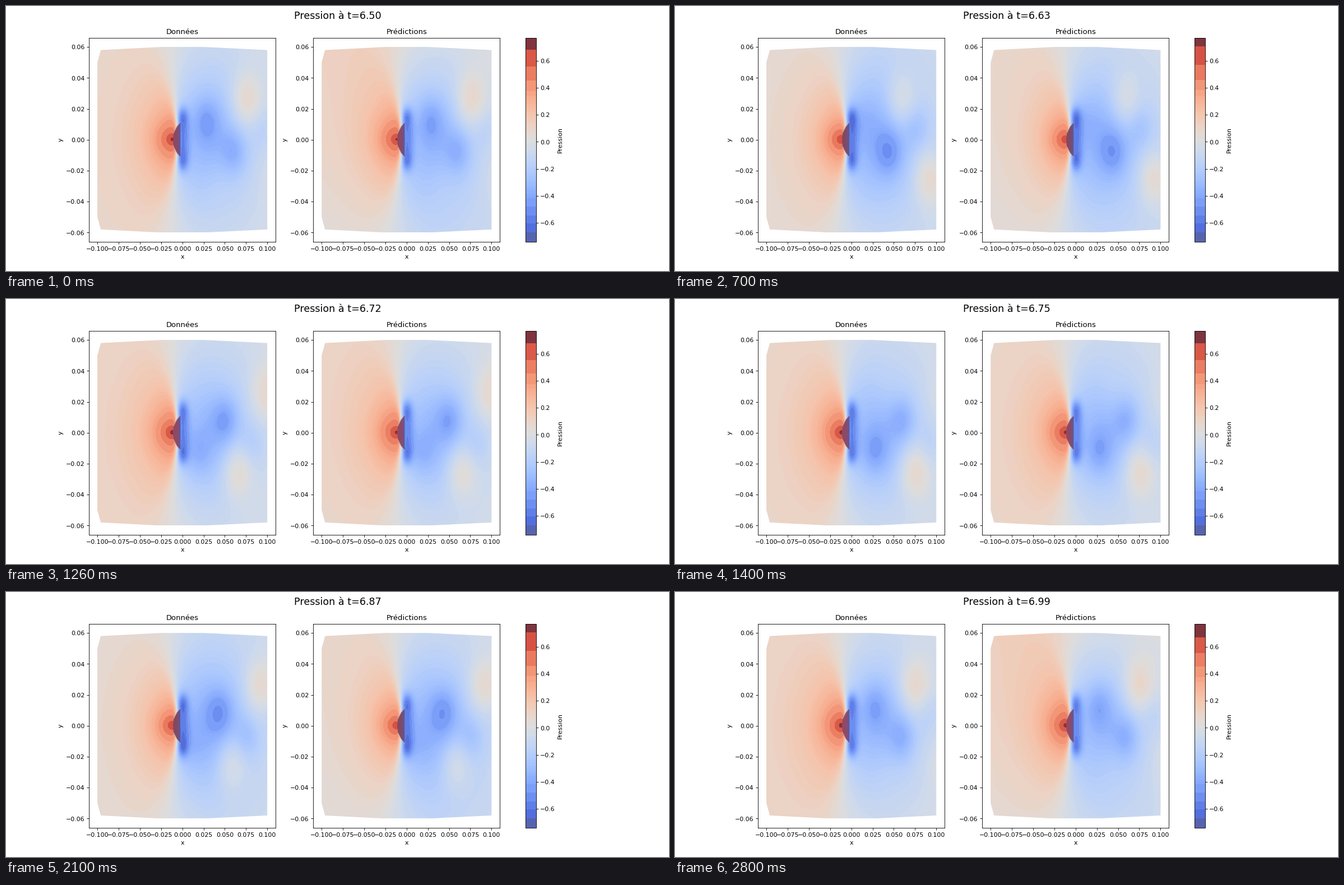
These frames come from a looping animation (1183 px wide and 473 px high, 2940 ms). A matplotlib script:

```python
import numpy as np
import matplotlib.pyplot as plt
from matplotlib.animation import FuncAnimation
from matplotlib.cm import ScalarMappable
from matplotlib.colors import ListedColormap, Normalize
from matplotlib.patches import Polygon

DPI = 78.88                   # 15 x 6 inches give 1183 x 473 pixels
FRAMES, STEP_MS = 21, 140
PERIOD = 6.7                  # shedding period, in frames
SPEED, WAVE = 0.0098, 0.0657  # vortex drift per frame, spacing per side
VMIN, VMAX, LOW = -0.74, 0.77, -0.67
DARK_RED, RED = (127, 52, 62), (194, 48, 50)
DARK_BLUE, BODY_BLUE = (86, 100, 175), (84, 92, 165)

x, y = np.meshgrid(np.linspace(-0.1, 0.1, 400), np.linspace(-0.06, 0.06, 400))


def sigmoid(v):
    return 1 / (1 + np.exp(-np.clip(v, -60, 60)))


def bump(cx, cy, sx, sy):
    return np.exp(-((x - cx) / sx) ** 2 - ((y - cy) / sy) ** 2)


def steady():
    """Stagnation zone ahead of the body and the mean wake behind it."""
    dx, r = x + 0.0115, np.abs(y)
    front = (0.02 + 0.36 / (1 + (dx ** 2 + (1.2 * y) ** 2) / 0.033 ** 2)
             + 0.34 * np.exp(-np.hypot(dx, 2 * y) / 0.01))
    wake = 0.38 / (1 + ((x - 0.032) / 0.05) ** 2 + (y / 0.045) ** 2)
    base = 0.32 * np.exp(-(x / 0.008) ** 2 - (r / 0.019) ** 4)
    lobes = 0.15 * (bump(0, 0.015, 0.006, 0.006) + bump(0, -0.015, 0.006, 0.006))
    edge = -0.007 - 0.22 * np.maximum(r - 0.012, 0)
    ahead = sigmoid((edge - x) / (0.001 + 3.3 * r ** 2))
    return front * ahead - (wake + base + lobes) * (1 - ahead)


STEADY = steady()


def vortices(i):
    """Alternating low-pressure cores with a high-pressure spot ahead of each."""
    p = np.zeros_like(x)
    for side, start in ((1, 0.028), (-1, 0.028 - WAVE / 2)):
        first = (start + SPEED * i) % WAVE
        for cx in first + WAVE * np.arange(-1, 3):
            amp = 0.17 / (1 + ((cx - 0.045) / 0.035) ** 2)
            amp *= sigmoid((cx - 0.008) / 0.004)
            cy = side * (0.008 + 0.005 * sigmoid((0.036 - cx) / 0.004))
            p -= amp * bump(cx, cy, 0.015, 0.014)
            sx = cx + 0.047
            high = 0.22 * sigmoid((sx - 0.05) / 0.005) * sigmoid((0.102 - sx) / 0.005)
            p += high * bump(sx, side * 0.025, 0.018, 0.018)
    return p


def level(i):
    """Uniform pressure surge, twice per shedding cycle."""
    turn = 2 * np.pi * (2 * i / PERIOD - 0.83)
    return 0.01 + 0.1 * np.exp(-2.5 * (1 - np.cos(turn)))


def fields(i):
    swirl = vortices(i)
    data = STEADY + swirl + level(i)
    tilt = 0.02 * (1 + np.cos(2 * np.pi * i / PERIOD))
    return data, 0.98 * STEADY + 0.95 * swirl + level(i) + tilt * y / 0.06


def palette(surge):
    """Coolwarm, fine in the middle and cut in wide bands at both ends."""
    top = 0.72 - 0.9 * surge
    k = np.linspace(0, 1, 5)
    edges = np.r_[VMIN, np.linspace(LOW, -0.42, 5), np.arange(-0.4, 0.33, 0.02),
                  0.34 + (top - 0.34) * k ** 1.6, VMAX]
    v = np.linspace(VMIN, VMAX, 256)
    band = np.clip(np.searchsorted(edges, v) - 1, 0, len(edges) - 2)
    mid = (edges[:-1] + edges[1:]) / 2
    # the end bands are a little paler than the plain map
    rgba = plt.get_cmap("coolwarm")((0.97 * mid[band] - VMIN) / (VMAX - VMIN))
    rgba[v >= top, :3] = np.array(RED if surge > 0.08 else DARK_RED) / 255
    rgba[v <= LOW, :3] = np.array(DARK_BLUE) / 255
    return ListedColormap(rgba)


def body_fill(surge):
    t = np.linspace(0, 1, 24)[None, :, None] ** 3
    red = np.array((128 + 400 * surge, 72, 96))
    return ((1 - t) * red + t * np.array(BODY_BLUE)) / 255


def mirrored(points):
    """Close an upper half outline with its reflection below y = 0."""
    return points + [(px, -py) for px, py in reversed(points)]


OUTLINE = mirrored([(-.1, .05), (-.096, .058), (-.025, .06), (.025, .06), (.1, .058)])
SLANT = [(-.011, .001), (-.0102, .0045), (-.0065, .0085), (-.0022, .0115)]
BODY = mirrored(SLANT)

fig, axes = plt.subplots(1, 2, figsize=(15, 6), dpi=DPI)
norm = Normalize(VMIN, VMAX)
scale = ScalarMappable(norm, palette(level(0)))
fig.colorbar(scale, ax=axes, label="Pression")
title = fig.suptitle("", fontsize=16)


def clipped(ax, img, extent, points, z, **kw):
    im = ax.imshow(img, extent=extent, origin="lower", aspect="auto",
                   interpolation="bilinear", zorder=z, **kw)
    im.set_clip_path(Polygon(points, transform=ax.transData))
    return im


def panel(ax, name):
    im = clipped(ax, STEADY, (-.1, .1, -.06, .06), OUTLINE, 1,
                 norm=norm, cmap=scale.get_cmap())
    body = clipped(ax, body_fill(level(0)), (-.011, -.0022, -.012, .012), BODY, 2)
    px, py = np.array(SLANT[1:]).T
    for side in (1, -1):
        ax.plot(px, side * py, color="#b9aeb2", lw=0.8, zorder=3)
    ax.set(title=name, xlabel="x", ylabel="y", xlim=(-.11, .11),
           ylim=(-.066, .066), xticks=np.linspace(-.1, .1, 9),
           yticks=np.linspace(-.06, .06, 7))
    return im, body


panels = [panel(ax, n) for ax, n in zip(axes, ("Données", "Prédictions"))]


def draw(i):
    surge = level(i)
    cmap = palette(surge)
    scale.set_cmap(cmap)
    for (im, body), field in zip(panels, fields(i)):
        im.set_data(field)
        im.set_cmap(cmap)
        body.set_data(body_fill(surge))
    title.set_text(f"Pression à t={6.504 + 0.0245 * i:.2f}")
    return []


anim = FuncAnimation(fig, draw, frames=FRAMES, interval=STEP_MS,
                     repeat=True, repeat_delay=0, blit=False)
plt.show()
```
